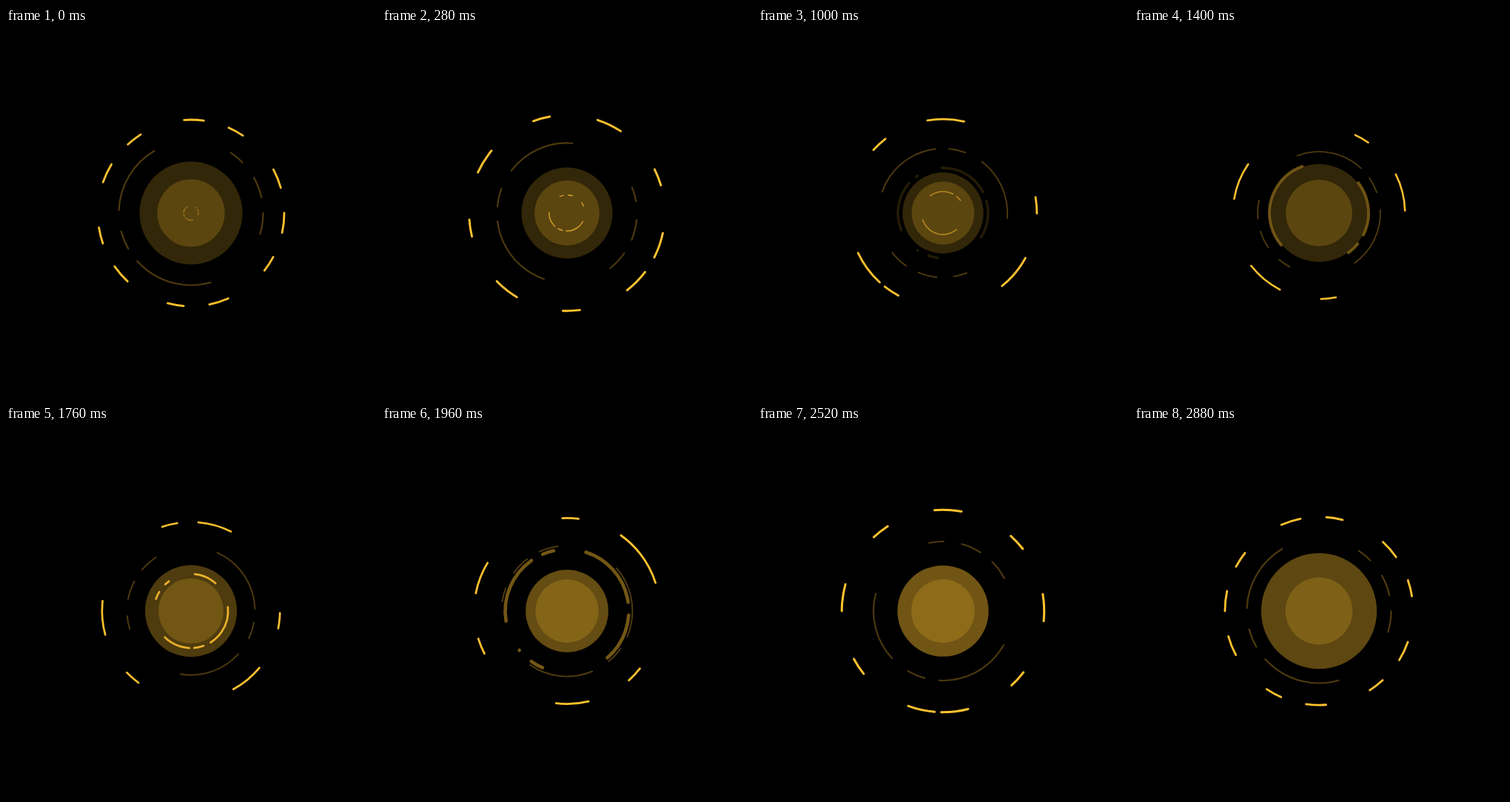
These frames come from a looping animation (500 px wide and 500 px high, 2920 ms). An HTML page with a canvas:

```html
<!DOCTYPE html>
<html lang="en">
<head>
<meta charset="utf-8">
<title>Pulsing rings</title>
<style>
html, body { margin: 0; height: 100%; overflow: hidden; background: #000; }
canvas { display: block; }
</style>
</head>
<body>
<canvas id="stage" width="500" height="500"></canvas>
<script>
const ctx = document.getElementById('stage').getContext('2d');
const LOOP = 2920, STEP = 40, SPIN = 2880;
const RAD = Math.PI / 180;

const mix = (a, b, p) => a + (b - a) * p;

// Straight rise from 0 to 1 at the peak, then straight back to 0
const pulse = (t, peak, end = SPIN) =>
  Math.max(0, t < peak ? t / peak : (end - t) / (end - peak));

// Triangle wave: 1 at even phases, -1 at odd ones
const zigzag = phase => 2 * Math.abs(1 - phase % 2) - 1;

function disc(r, alpha) {
  ctx.globalAlpha = alpha;
  ctx.beginPath();
  ctx.arc(0, 0, r, 0, 2 * Math.PI);
  ctx.fill();
}

// Dash lengths and turn are in degrees; the stroke scales with the radius
function ring(r, weight, alpha, turn, dashes) {
  ctx.save();
  ctx.rotate(turn * RAD);
  ctx.globalAlpha = alpha;
  ctx.lineWidth = weight * r;
  ctx.setLineDash(dashes.map(d => Math.max(d, 0.1) * RAD * r));
  ctx.beginPath();
  ctx.arc(0, 0, r, 0, 2 * Math.PI);
  ctx.stroke();
  ctx.restore();
}

const uneven = (a, b) => [a, b, 64, 12, 15];

// A dashed ring that leaves the core and fades; a higher power fades later
function ripple(age, life, speed, power, strength, turn, a, b) {
  if (age < 0 || age >= life) return;
  const alpha = strength * (1 - (age / life) ** power);
  ring(10 + speed * age, 0.055, alpha, turn, uneven(a, b));
}

function drawCore(t) {
  const late = Math.max(0, t - 1520);
  const beat = late ? 2 + late / 700 : t / 760;
  const swing = zigzag(beat);
  const reach = beat > 3 ? 16.1 : 10.85;
  const glow = late ? pulse(late, 680, 2220) : 0;
  disc(47.8 + reach * (1 + swing), mix(0.2, 0.5, glow));
  disc(43.3 + 2.3 * swing, 0.2);
}

function drawRings(t) {
  ring(mix(97.5, 82.9, pulse(t, 1400)), 0.0225, 0.3, t / 8, uneven(17, 57));

  // Swings by a tenth: out, in, out, and back to rest
  const sway = t < 560 ? t / 560 : zigzag((t - 560) / 945);
  const turn = t < 1360 ? 180 * t / 1360 : mix(180, 540, (t - 1360) / (SPIN - 1360));
  const stretch = pulse(t, 1320);
  ring(126 * (1 + sway / 10), 0.0222, 1, turn,
    [mix(12.2, 25.8, stretch), mix(15.9, 83.7, stretch), 10, 28.3]);
}

function drawRipples(t) {
  ripple(t, 1170, 0.051, 1, 1, -t / 8, 17 - 0.0165 * t, 57 - 0.0242 * t);

  const second = t - 800;
  ripple(second, 960, 0.095, 3, 0.55, 30.5 + 0.2225 * second, 86, 72);

  const third = t - 1520;
  ripple(third, 560, 0.167, 2.5, 1, -0.233 * third, 17 - 0.04 * third, 57 - 0.061 * third);
}

function draw(t) {
  ctx.setTransform(1, 0, 0, 1, 0, 0);
  ctx.globalAlpha = 1;
  ctx.fillStyle = '#000';
  ctx.fillRect(0, 0, 500, 500);
  ctx.translate(250, 250);
  ctx.fillStyle = ctx.strokeStyle = '#ffc12e';
  ctx.lineCap = 'round';
  drawCore(t);
  drawRings(t);
  drawRipples(t);
}

function frame() {
  draw(Math.floor(performance.now() % LOOP / STEP) * STEP);
  requestAnimationFrame(frame);
}
frame();
</script>
</body>
</html>
```
